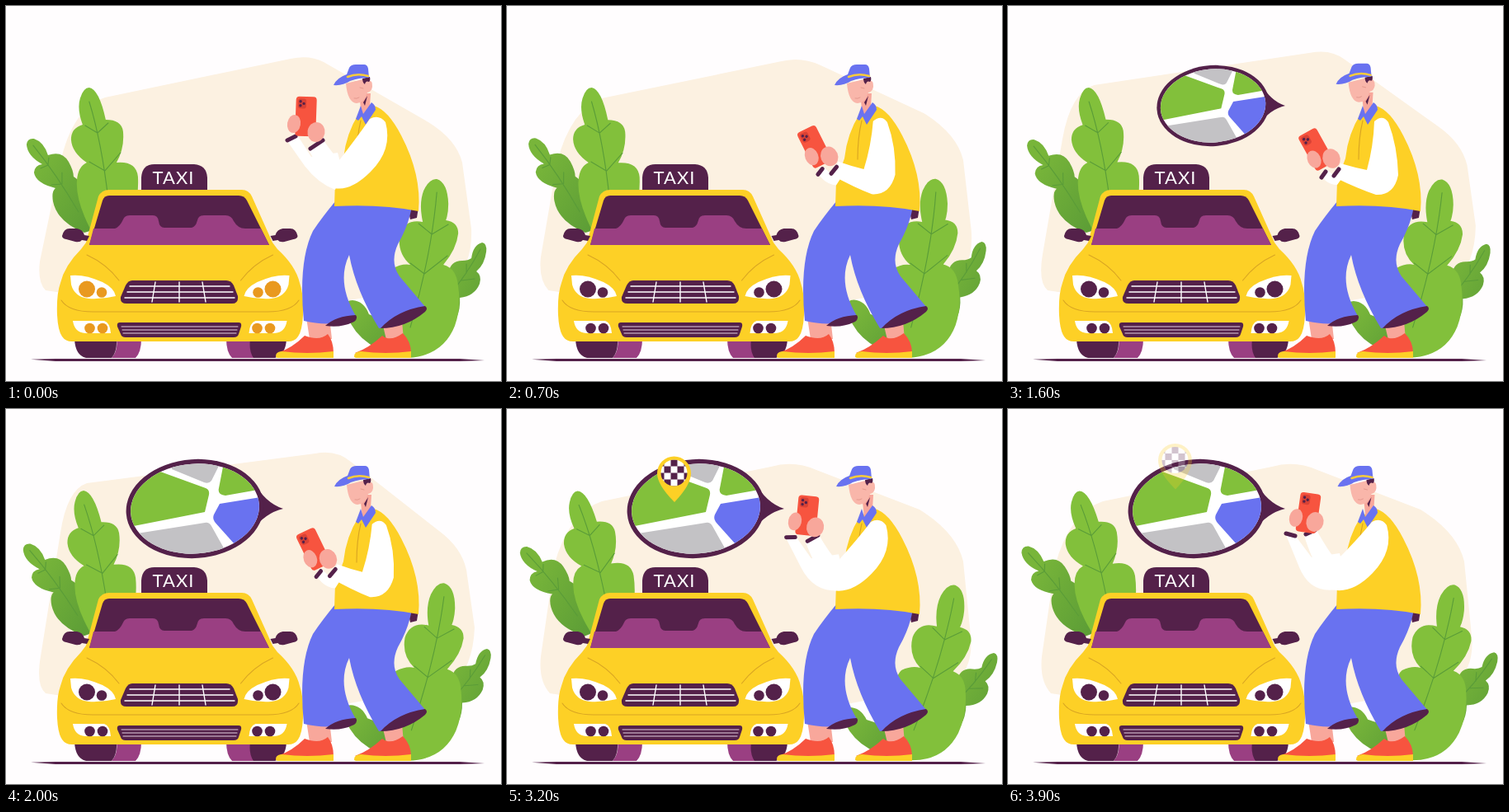
These frames come from a looping animation (600 by 455 pixels, 4000 ms). An HTML page:

```html
<!DOCTYPE html>
<html lang="en">
<head>
<meta charset="utf-8">
<title>Taxi order</title>
<style>
  html, body { margin: 0; width: 100%; height: 100%; overflow: hidden; background: #fffdfe; }
  svg { display: block; width: 600px; height: 455px; }
  .dark { fill: #54214a; }
  .plum { fill: #9a3f82; }
  .yellow { fill: #fdd026; }
  .blue { fill: #6972f0; }
  .red { fill: #f7543f; }
  .skin { fill: #f8a79b; }
  .white { fill: #fff; }
  .leaf { fill: #82c03b; }
  .shade { fill: url(#shade); }
  .gray { fill: #c3c2c5; }
  .line { fill: none; stroke-linecap: round; stroke-linejoin: round; }
  .vein { stroke: #5a9c38; stroke-width: 1.1; }
  .seam { stroke: #d9a522; stroke-width: 1.1; }
  .cuff { stroke: #54214a; stroke-width: 5; }
  .lamps { fill: color-mix(in srgb, #e9991f var(--lamp), #54214a); }
</style>
</head>
<body>
<svg viewBox="0 0 600 455">
  <defs>
    <linearGradient id="shade" x2="1" y2="1">
      <stop offset=".2" stop-color="#78b53a"/>
      <stop offset="1" stop-color="#5b9c36"/>
    </linearGradient>
    <clipPath id="mapClip"><ellipse cx="229" cy="121" rx="78" ry="54.5" transform="rotate(-4 229 121)"/></clipPath>
    <pattern id="checker" x="190.5" y="69.5" width="16" height="16" patternUnits="userSpaceOnUse">
      <path class="white" d="M0 0H16V16H0Z"/>
      <path class="dark" d="M0 0H8V16H16V8H0Z"/>
    </pattern>
  </defs>

  <path id="blob" fill="#fcf1e1"/>

  <g id="leftPlant">
    <path class="shade" d="M95 275Q62 262 57 237Q55 225 60 221Q36 215 34 202Q35 193 44 192Q26 182 25 168Q26 160 34 161Q46 165 51 181Q68 175 76 189Q82 200 82 207Q95 215 105 240V272Z"/>
    <path class="line vein" d="M33 169Q62 205 88 250M51 193L52 184M51 193L42 197M68 216V202M68 216L55 217"/>
    <path class="leaf" d="M110 285Q84 240 86 212Q87 195 98 190Q80 178 79 162Q79 148 93 144Q86 125 90 112Q94 99 101 99Q113 101 121 138Q140 138 142 152Q144 172 134 190Q158 188 160 207Q162 240 145 285Z"/>
    <path class="line vein" d="M101 116Q116 165 124 235M111 154L96 145M111 154L124 142M120 200L101 189M120 200L139 178"/>
  </g>

  <path id="lowLeaf" class="shade" d="M475 425Q420 410 411 366Q411 357 420 357Q434 358 440 374Q458 380 475 400Z"/>
  <g id="rightPlant">
    <path class="shade" d="M520 395Q525 350 536 325Q538 309 553 309Q560 309 564 306Q566 290 577 287Q583 288 582 298Q580 314 570 322Q577 327 574 337Q568 352 550 354Q552 380 530 400Z"/>
    <path class="line vein" d="M575 295Q556 330 536 352M558 324V313M552 333L568 331"/>
    <path class="leaf" d="M468 426Q455 330 468 319Q480 312 490 314Q474 300 477 278Q483 258 505 262Q500 240 506 224Q513 209 522 210Q535 214 536 240Q536 252 533 260Q548 262 548 276Q546 295 530 314Q546 318 548 340Q552 365 544 388Q530 424 488 427Z"/>
    <path class="line vein" d="M522 226Q516 300 490 390M516 277L500 264M516 277L536 265M507 325L490 312M507 325L535 303"/>
  </g>

  <path class="dark" d="M30 428.8L60 428H550L580 430L550 431H60Z"/>

  <g id="car">
    <path class="plum" d="M128 427Q136 418 134 404H164Q164 420 157 427ZM267 404H302V427H274Q267 420 267 404Z"/>
    <path class="dark" d="M83 404H134Q135 419 128 427H97Q84 424 83 404ZM296 404H340Q339 423 326 427H300Q294 418 296 404Z"/>
    <path class="dark" d="M164 226V208Q165 192 180 192H228Q243 193 244 208V226Z"/>
    <text class="white" x="203" y="216" font-family="Lato, Open Sans, sans-serif" font-size="22" letter-spacing="1" text-anchor="middle">TAXI</text>
    <path class="yellow" d="M125 223H286Q294 223 298 231L323 287L329 295Q351 315 356 336Q361 350 360 375Q359 394 354 401Q350 407 342 407H80Q72 407 68 401Q63 394 62 375Q61 350 66 336Q71 315 91 295L97 287L112 231Q116 223 125 223Z"/>
    <path class="dark" d="M125 230H282Q289 230 292 236L319 290H101L117 236Q119 230 125 230Z"/>
    <path class="plum" d="M106 270H132Q138 268 142 259Q144 254 150 254H178Q184 254 185 261Q186 269 192 269H225Q230 268 232 260Q233 254 240 254H266Q273 254 276 261Q281 270 290 270H309L319 290H101Z"/>
    <g id="side">
      <path class="dark" d="M68 279Q70 270 77 270H86Q93 271 95 278L101 279L98 285L92 284Q90 287 84 286L73 283Q68 282 68 279Z"/>
      <path class="line seam" d="M98 302Q122 313 137 333"/>
      <path class="white" d="M78 327Q95 325 117 335Q131 342 133 352Q117 356 100 355Q83 353 79 338Z"/>
      <path class="white" d="M81 382H119Q126 384 127 397H96Q83 396 81 382Z"/>
      <g class="lamps">
        <circle cx="98" cy="343.5" r="10"/><circle cx="116" cy="347.5" r="6.3"/>
        <circle cx="101.5" cy="391" r="6.3"/><circle cx="117" cy="391" r="6.3"/>
      </g>
    </g>
    <use href="#side" transform="matrix(-1 0 0 1 421.5 0)"/>
    <path class="line seam" d="M67 357Q76 371 105 371H317Q346 371 355 357"/>
    <path class="dark" d="M153 333H267Q273 333 276 339L281 352Q282 361 274 361H146Q138 361 139 353L145 339Q148 333 153 333Z"/>
    <path class="line" stroke="#fff" stroke-width="1.4" d="M150 340H271M147 347H275M144 354H277M181 335L177 359M210 335V359M238 335L242 359"/>
    <path class="dark" d="M138 384H282Q286 384 285 389L282 398Q281 402 276 402H145Q140 402 139 398L135 389Q134 384 138 384Z"/>
    <path class="line" stroke="#e3cfe0" d="M140 389H281M141 393H280M142 397H279"/>
  </g>

  <g id="legs">
    <path class="skin" d="M364 378H392L395 404H368ZM457 388L480 382L482 405H461Z"/>
    <path class="red" d="M329 421Q347 415 362 400Q380 407 390 398Q397 407 397 421ZM423 421Q440 415 456 400Q466 408 481 397Q491 407 491 421Z"/>
    <path class="yellow" d="M327 426Q326 420 334 419Q365 423 397 419V427H329ZM422 426Q421 420 430 419Q460 423 491 419V427H424Z"/>
    <path class="dark" d="M487 244H500L498 257L490 259Z"/>
    <path class="blue" d="M400 236L491 240V248Q487 268 475 289Q465 311 477 328L509 366Q485 387 452 391Q424 345 416 302Q400 335 424 376Q400 391 361 382Q354 310 372 273Q384 255 400 236Z"/>
    <path class="dark" d="M387 388Q400 376 424 375Q427 379 422 383Q406 391 387 388ZM454 391Q474 369 508 364Q512 367 508 371Q484 391 454 391Z"/>
  </g>

  <path class="yellow" d="M428 130Q412 155 409 185L399 212L398 243Q455 240 500 249Q504 205 479 157Q463 126 446 121Z"/>
  <path class="line seam" d="M430 139Q425 160 425 186"/>

  <g id="head">
    <path class="skin" d="M428 106H442L441 122L431 134Z"/>
    <path class="dark" d="M433 117L438 109L435 121Z"/>
    <path fill="#f9b6aa" d="M412 94L436 88Q445 90 444 98Q443 104 438 105Q434 118 425 118Q414 117 412 94Z"/>
    <path class="dark" d="M432 88L441 86Q442 90 440 92Q436 90 435 95Q432 93 432 88Z"/>
    <path class="line" stroke="#e59a8f" d="M429 99L433 100M422 112Q425 113 428 111"/>
    <path class="blue" d="M397 96Q401 87 413 83L416 75Q418 71 424 71H434Q438 71 439 76L440 87Q428 87 417 91Q408 97 397 96Z"/>
    <path class="line" stroke="#f7cb3b" stroke-width="2.5" d="M414 86Q426 81 439 85"/>
  </g>
  <path class="blue" d="M424 137L430 121L433 131L443 117Q448 120 448 126L436 144L431 134L427 139Z"/>

  <path id="farSleeve" class="white"/>
  <path id="farCuff" class="line cuff"/>
  <path id="nearSleeve" class="white"/>
  <path id="nearCuff" class="line cuff"/>
  <g id="phone">
    <rect class="red" x="-12.5" y="-24" width="25" height="48" rx="4"/>
    <rect x="-10" y="-21.5" width="10" height="12" rx="3" fill="#d94235"/>
    <g class="dark"><circle cx="-7" cy="-18" r="1.7"/><circle cx="-7" cy="-13" r="1.7"/><circle cx="-3" cy="-15.5" r="1.7"/></g>
  </g>
  <ellipse id="farHand" class="skin" rx="8" ry="11"/>
  <ellipse id="nearHand" class="skin" rx="10.5" ry="12"/>

  <g id="bubble">
    <path class="dark" d="M300 88Q314 114 336 121Q314 126 298 148Z"/>
    <ellipse class="dark" cx="229" cy="121" rx="83.5" ry="60" transform="rotate(-4 229 121)"/>
    <g clip-path="url(#mapClip)">
      <path class="white" d="M140 55H320V185H140Z"/>
      <path class="leaf" d="M140 90L187 76L242 96Q247 98 246 104L241 125L140 145ZM264 65L312 97L266 105Q256 104 258 96Z"/>
      <path class="gray" d="M200 60H261L257 71L249 87Q246 91 240 89L201 73ZM140 154L241 138Q246 137 249 142L267 174L240 190H140Z"/>
      <path class="blue" d="M259 115L315 106V150L277 164L253 137Q250 133 252 128Z"/>
    </g>
  </g>
  <g id="pin">
    <path class="yellow" d="M203 113Q182 92 182 78A20.5 20.5 0 0 1 223 78Q223 92 203 113Z"/>
    <circle cx="202.5" cy="77.5" r="16" fill="url(#checker)"/>
  </g>
</svg>
<script>
const LOOP = 4000, STEP = 100;
const el = id => document.getElementById(id);
const set = (id, name, value) => el(id).setAttribute(name, value);
const clamp = x => Math.min(1, Math.max(0, x));
const ease = x => (x = clamp(x)) * x * (3 - 2 * x);
const backOut = x => 1 + 2.7 * (x - 1) ** 3 + 1.7 * (x - 1) ** 2;

// Smooth curve through [time, value] keys
function track(t, keys) {
  const last = keys.length - 1;
  let i = 0;
  while (i < last - 1 && keys[i + 1][0] <= t) i++;
  const slope = j => {
    const a = keys[Math.max(0, j - 1)], b = keys[Math.min(last, j + 1)];
    return (b[1] - a[1]) / (b[0] - a[0]);
  };
  const [t0, v0] = keys[i], [t1, v1] = keys[i + 1];
  const d = t1 - t0, u = clamp((t - t0) / d), w = 1 - u;
  return w * w * ((1 + 2 * u) * v0 + u * d * slope(i)) + u * u * ((3 - 2 * u) * v1 - w * d * slope(i + 1));
}

// Blend three strings with matching numbers; k runs from 0 to 2
function blend([a, b, c], k) {
  k = Math.min(2, Math.max(0, k));
  const [from, to, f] = k < 1 ? [a, b, k] : [b, c, k - 1];
  const ends = to.match(/-?[\d.]+/g);
  let i = 0;
  return from.replace(/-?[\d.]+/g, n => (+n + (ends[i++] - n) * f).toFixed(2));
}

const blobs = [
  "M52 345Q38 330 41 300L57 190Q75 125 115 112L320 70Q348 62 375 74L500 122Q545 150 553 185L562 275Q566 315 540 335L400 360Q200 370 52 345Z",
  "M48 345Q38 335 41 310L66 190Q80 125 120 111L345 64Q368 59 385 68L512 141Q546 162 553 190L564 270Q566 315 540 335L400 360Q200 370 48 345Z",
  "M48 345Q36 335 42 300L66 150Q74 98 98 90L375 54Q400 49 418 64L525 148Q552 168 558 195L568 265Q566 315 540 335L400 360Q200 370 48 345Z"
];

// Poses: phone high, phone in front, phone low
const arms = {
  farSleeve: [
    "M337 153L350 156L368 180L402 175L408 200L398 219Q366 224 353 192Z",
    "M341 164L354 158L370 183L402 178L408 200L399 223Q378 215 362 194Z",
    "M380 207L387 199L393 204L402 205L404 210L399 217Q391 217 385 212Z"],
  farCuff: ["M337 151L348 154", "M341 163L351 158", "M380 208L385 201"],
  nearSleeve: [
    "M441 137Q452 131 459 141Q468 172 442 199Q417 225 392 219Q372 195 359 154L374 147Q388 172 398 184Q424 158 441 137Z",
    "M441 137Q452 131 460 141Q469 174 442 201Q418 225 398 221Q383 205 367 175L385 163Q395 178 404 187Q425 160 441 137Z",
    "M444 140Q454 131 461 141Q472 170 473 205Q468 230 446 229Q425 222 396 208L403 191Q420 196 435 199Q443 170 444 140Z"],
  nearCuff: ["M361 152L372 147", "M369 173L384 163", "M395 206L401 198"]
};
const holds = {
  phone: ["translate(364 126) rotate(8)", "translate(363.5 134) rotate(2)", "translate(373.5 174) rotate(-29)"],
  farHand: ["translate(349 132) rotate(15)", "translate(349 143) rotate(10)", "translate(371 186) rotate(-25)"],
  nearHand: ["translate(372 137) rotate(15)", "translate(376 153) rotate(10)", "translate(392 185) rotate(-25)"]
};

function draw(t) {
  set("blob", "d", blend(blobs, track(t, [[0, 1], [400, .1], [1100, 1.1], [2000, 2], [2500, 1.4], [3200, 0], [3900, 0]])));

  const sway = Math.cos((t - 600) / 5600 * 2 * Math.PI) - .8;
  set("leftPlant", "transform", `rotate(${sway * 2.7} 100 282)`);
  set("rightPlant", "transform", `rotate(${-sway * 3.3} 495 420)`);
  set("lowLeaf", "transform", `rotate(${sway * 3} 470 420)`);

  const pose = track(t, [[0, 1], [400, 1.64], [700, 1.92], [1100, 2], [1700, 2], [2000, 1.9], [2500, 1.09], [3200, .4], [3900, 0]]);
  for (const id in arms) set(id, "d", blend(arms[id], pose));
  for (const id in holds) set(id, "transform", blend(holds[id], pose));

  const lift = ease((t - 1100) / 900);
  set("head", "transform", `translate(${lift + ease((t - 2000) / 1900) * 1.5} ${-2 * lift})`);

  document.body.style.setProperty("--lamp", 100 - 100 * ease((t - 250) / 500) + "%");

  const size = t < 1500 ? 0 : backOut(clamp((t - 1500) / 400));
  set("bubble", "transform", `translate(336 121) scale(${size}) translate(-336 -121)`);

  const shown = ease((t - 2000) / 400) * (1 - ease((t - 3700) / 300));
  set("pin", "opacity", shown);
  set("pin", "transform", `translate(0 ${-21 * (1 - shown)})`);
}

function tick() {
  draw(Math.floor(performance.now() % LOOP / STEP) * STEP);
  requestAnimationFrame(tick);
}
tick();
</script>
</body>
</html>
```
